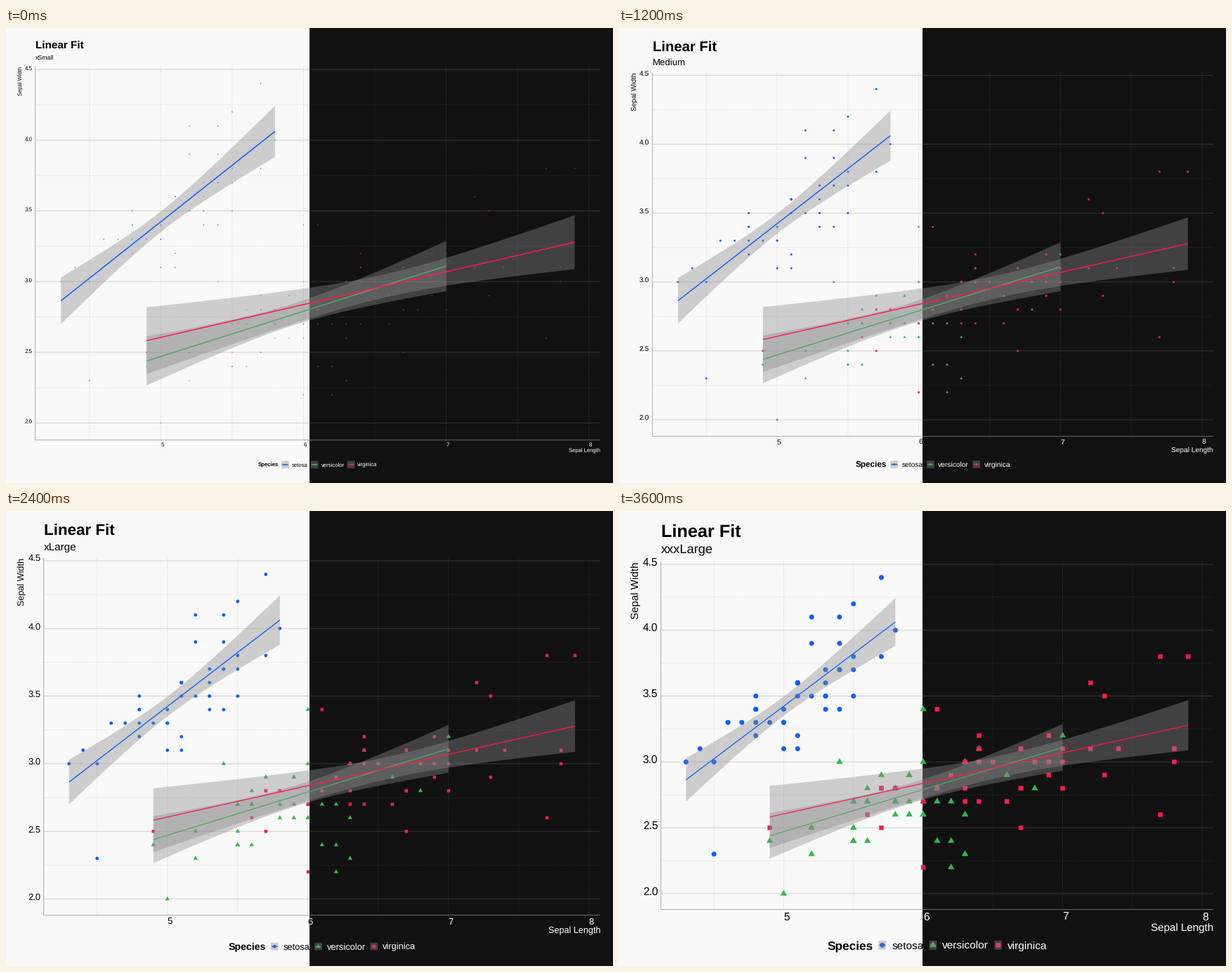
Animation of 864 by 648 pixels, one loop 4200 ms. Source, as a matplotlib script:

```python
from collections import namedtuple

import matplotlib.pyplot as plt
import numpy as np
from matplotlib.animation import FuncAnimation
from matplotlib.collections import PolyCollection

W, H, SPLIT, RIGHT = 864, 648, 432, 846
XMIN, XMAX, YMIN, YMAX = 4.12, 8.08, 1.88, 4.52
BAND = dict(facecolor="#8b8b8b", alpha=0.4, linewidth=0)
KEY = 10.6
NAMES = ["xSmall", "Small", "Medium", "Large",
         "xLarge", "xxLarge", "xxxLarge"]

plt.rcParams.update({"font.family": "Liberation Sans",
                     "text.hinting": "none", "path.snap": False})

Theme = namedtuple("Theme", "paper ink axis major minor")
LIGHT = Theme("#f9f9f9", "#000000", "#a2a2a2", "#cccccc", "#e4e4e4")
DARK = Theme("#111111", "#ffffff", "#747474", "#3b3b3b", "#232323")

turn = np.linspace(0, 2 * np.pi, 32, endpoint=False)
CIRCLE = 0.5 * np.column_stack([np.cos(turn), np.sin(turn)])
SQUARE = 0.46 * np.array([(-1, -1), (1, -1), (1, 1), (-1, 1)])
TRIANGLE = 0.5 * np.array([(0, -1.55), (1.342, 0.775), (-1.342, 0.775)])


class Species:
    """A linear trend, its outer points and a seeded cloud around it."""

    def __init__(self, name, color, shape, mean, slope, spread, error, outer):
        self.name, self.color, self.shape = name, color, shape
        self.mean, self.slope = mean, slope
        self.spread, self.error = spread, error
        self.lo, self.hi = outer[0][0], outer[-1][0]
        rng = np.random.default_rng(len(name))
        x = rng.normal(mean[0], 0.8 * spread, 36)
        x = np.clip(x, self.lo + 0.1, self.hi - 0.1).round(1)
        y = self.trend(x) + rng.normal(0, 0.75 * error, 36)
        self.points = np.vstack([np.column_stack([x, y.round(1)]), outer])

    def trend(self, x):
        return self.mean[1] + self.slope * (x - self.mean[0])

    def margin(self, x):
        z = (x - self.mean[0]) / self.spread
        return 2.0106 * self.error * np.sqrt(1 / 50 + z ** 2 / 49)


SPECIES = [
    Species("setosa", "#0a60ff", CIRCLE,
            (5.006, 3.428), 0.7985, 0.3525, 0.2566,
            [(4.3, 3.0), (4.5, 2.3), (5.2, 4.1), (5.5, 4.2),
             (5.5, 3.5), (5.7, 4.4), (5.7, 3.8), (5.8, 4.0)]),
    Species("versicolor", "#30b94b", TRIANGLE,
            (5.936, 2.770), 0.3197, 0.5162, 0.2697,
            [(4.9, 2.4), (5.0, 2.0), (5.4, 3.0), (6.0, 3.4),
             (6.2, 2.2), (6.3, 2.3), (6.8, 2.8), (7.0, 3.2)]),
    Species("virginica", "#ff1a50", SQUARE,
            (6.588, 2.974), 0.2319, 0.6359, 0.2898,
            [(4.9, 2.5), (5.7, 2.5), (6.0, 2.2), (6.7, 2.5),
             (7.2, 3.6), (7.7, 2.6), (7.7, 3.8), (7.9, 3.8)]),
]


def ramp(i, first, second, third, last):
    """Two small sizes, then an eased rise from the third to the last."""
    if i < 2:
        return (first, second)[i]
    return third + (last - third) * ((i - 2) / 4) ** 1.25


class Plot:
    """Draws the chart at one text size in one theme."""

    def __init__(self, ax, theme, i):
        self.ax, self.theme, self.name = ax, theme, NAMES[i]
        self.size = 7.6 + 1.25 * (i if i > 1 else 0)
        self.left = 23.3 + 2.41 * self.size
        self.top = ramp(i, 55, 56, 63.4, 72.2)
        self.bottom = ramp(i, 586.8, 586.8, 581.6, 567.5)
        self.title = ramp(i, 15.3, 16, 20.2, 25.3)
        self.sub = ramp(i, 8.7, 9, 13.2, 18.2)
        self.head = ramp(i, 7.7, 8.1, 11.8, 17.2)
        self.legend_y = ramp(i, 621.8, 621.8, 621.5, 618.3)
        self.dot = 1.4 + 0.67 * i + 0.045 * i * i
        self.weight = 1.85 - 0.04 * self.size

    def px(self, x):
        return self.left + (x - XMIN) / (XMAX - XMIN) * (RIGHT - self.left)

    def py(self, y):
        share = (y - YMIN) / (YMAX - YMIN)
        return self.bottom - share * (self.bottom - self.top)

    def text(self, x, y, label, size, **kw):
        kw = {"ha": "left", "va": "baseline", "color": self.theme.ink, **kw}
        return self.ax.text(x, y, label, fontsize=size, clip_on=True, **kw)

    def line(self, x, y, color, width, **kw):
        self.ax.plot(x, y, color=color, lw=width,
                     solid_capstyle="butt", dash_capstyle="butt", **kw)

    def dots(self, sp, centres):
        shapes = np.array(centres)[:, None] + sp.shape * self.dot
        self.ax.add_collection(PolyCollection(
            shapes, facecolor=sp.color, linewidth=0, zorder=2, snap=False),
            autolim=False)

    def grid(self):
        t = self.theme
        across, down = (self.left, RIGHT), (self.top, self.bottom)
        dotted, dashed = (0, (1.5, 2)), (0, (3, 1.5))
        for x in np.arange(4.5, 8):
            self.line([self.px(x)] * 2, down, t.minor, 0.9, ls=dashed)
        for y in np.arange(2.25, 4.5, 0.5):
            self.line(across, [self.py(y)] * 2, t.minor, 0.9, ls=dashed)
        for x in range(5, 9):
            self.line([self.px(x)] * 2, down, t.major, 0.9, ls=dotted)
        for y in np.arange(2, 4.6, 0.5):
            self.line(across, [self.py(y)] * 2, t.major, 0.9)
        self.line([self.left] * 2, down, t.axis, 0.9)
        self.line(across, [self.bottom] * 2, t.axis, 0.9)

    def labels(self):
        size = self.size
        tick = size * 1.03
        self.text(self.left, 18.9 + 0.7 * self.title, "Linear Fit",
                  self.title, weight="bold")
        self.text(self.left, self.top - 8.9 - 0.19 * size, self.name,
                  self.sub)
        self.text(17.4 + 0.727 * size, self.top, "Sepal Width", size,
                  ha="right", rotation=90, rotation_mode="anchor")
        self.text(RIGHT, self.bottom + 5.8 + 1.6 * size, "Sepal Length",
                  size, ha="right")
        for y in np.arange(2, 4.6, 0.5):
            self.text(self.left - 4.3, self.py(y) + 0.1 * size, f"{y:.1f}",
                      tick, ha="right")
        for x in range(5, 9):
            self.text(self.px(x) + 0.28 * size,
                      self.bottom + 4 + 0.72 * size, str(x), tick,
                      ha="center")

    def points(self):
        for sp in SPECIES:
            x, y = sp.points.T
            self.dots(sp, np.column_stack([self.px(x), self.py(y)]))

    def fits(self):
        for order, sp in enumerate(SPECIES, 3):
            x = np.linspace(sp.lo, sp.hi, 80)
            y, half = sp.trend(x), sp.margin(x)
            self.ax.fill_between(self.px(x), self.py(y - half),
                                 self.py(y + half), zorder=order, **BAND)
            self.line(self.px(x), self.py(y), sp.color, self.weight,
                      zorder=order + 0.5)

    def key(self, sp, x):
        mid, half = self.legend_y, max(KEY, 0.85 * self.size) / 2
        self.dots(sp, [(x + KEY / 2, mid)])
        self.ax.fill_between([x, x + KEY], mid - half, mid + half,
                             zorder=3, **BAND)
        self.line([x + 0.1 * KEY, x + 0.9 * KEY], [mid, mid], sp.color,
                  self.weight, zorder=4)

    def legend(self):
        size, gap = self.size * 1.02, 0.54 * self.size
        texts = [self.text(0, self.legend_y + 0.36 * self.head, "Species",
                           self.head, weight="bold")]
        texts += [self.text(0, self.legend_y + 0.36 * size, sp.name, size)
                  for sp in SPECIES]
        widths = [t.get_window_extent().width for t in texts]
        total = sum(widths) + len(SPECIES) * (KEY + 2 * gap)
        x = (self.left + RIGHT - total) / 2
        texts[0].set_x(x)
        x += widths[0] + gap
        for sp, label, width in zip(SPECIES, texts[1:], widths[1:]):
            self.key(sp, x)
            label.set_x(x + KEY + gap)
            x += KEY + width + 2 * gap

    def draw(self):
        self.grid()
        self.labels()
        self.points()
        self.fits()
        self.legend()


fig = plt.figure(figsize=(W / 72, H / 72), dpi=72)
halves = [
    (fig.add_axes([0, 0, SPLIT / W, 1]), LIGHT, (0, SPLIT)),
    (fig.add_axes([SPLIT / W, 0, 1 - SPLIT / W, 1]), DARK, (SPLIT, W)),
]


def update(i):
    for ax, theme, span in halves:
        ax.clear()
        ax.set(xlim=span, ylim=(H, 0), xticks=[], yticks=[],
               facecolor=theme.paper, autoscale_on=False)
        ax.spines[:].set_visible(False)
        Plot(ax, theme, i).draw()
    return []


anim = FuncAnimation(fig, update, frames=len(NAMES), init_func=lambda: [],
                     interval=600, repeat=True, repeat_delay=0)
plt.show()
```
